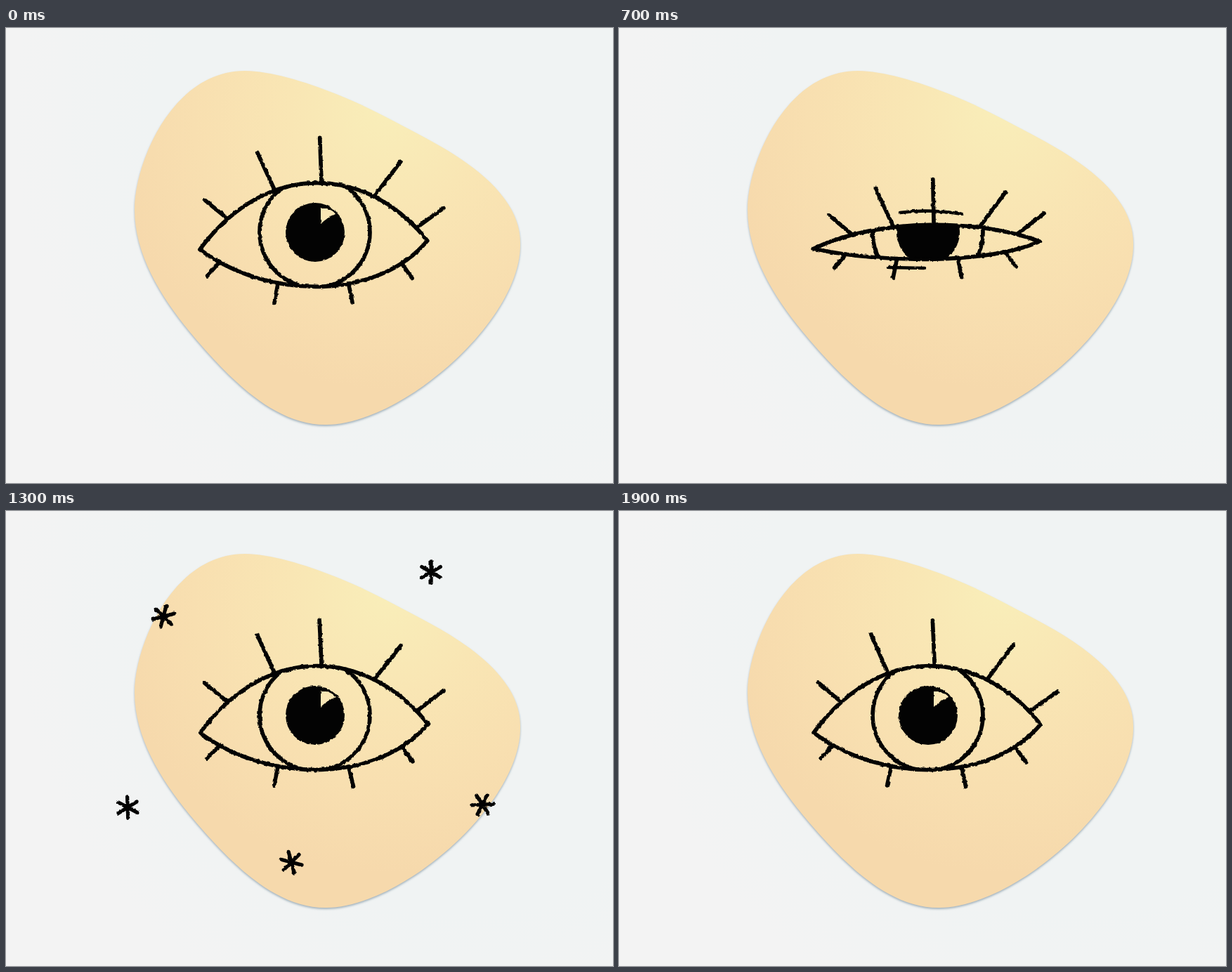
An HTML page for the animation above (2000 ms loop, 864 by 648 pixels).

```html
<!DOCTYPE html>
<html lang="en">
<head>
<meta charset="utf-8">
<title>Blinking eye</title>
<style>
  html, body { margin: 0; width: 100%; height: 100%; overflow: hidden; background: #f2f3f3; }
  svg { display: block; width: 100vw; height: 100vh; }
  .ink { fill: none; stroke: #030303; stroke-width: 5.7; stroke-linecap: round; stroke-linejoin: round; }
</style>
</head>
<body>
<svg viewBox="0 0 864 648">
  <defs>
    <radialGradient id="sky" gradientUnits="userSpaceOnUse" cx="650" cy="130" r="800">
      <stop offset="0" stop-color="#f0f3f3"/>
      <stop offset=".55" stop-color="#f0f3f3"/>
      <stop offset=".8" stop-color="#f3f3f3"/>
    </radialGradient>
    <radialGradient id="sand" gradientUnits="userSpaceOnUse" cx="545" cy="115" r="400">
      <stop offset="0" stop-color="#f9eeb9"/>
      <stop offset=".35" stop-color="#f9e6b4"/>
      <stop offset=".7" stop-color="#f8dfb0"/>
      <stop offset="1" stop-color="#f6d9ac"/>
    </radialGradient>
    <filter id="shade" x="-5%" y="-5%" width="110%" height="110%">
      <feDropShadow dx="0" dy="2" stdDeviation="1.5" flood-color="#8fa3ae" flood-opacity=".8"/>
    </filter>
    <filter id="rough" filterUnits="userSpaceOnUse" x="0" y="0" width="864" height="648" color-interpolation-filters="sRGB">
      <feTurbulence id="grain" type="fractalNoise" baseFrequency=".18" numOctaves="2" result="noise"/>
      <feDisplacementMap in="SourceGraphic" in2="noise" scale="3.4" xChannelSelector="R" yChannelSelector="G"/>
    </filter>
    <clipPath id="opening"><path id="hole"/></clipPath>
  </defs>

  <rect width="864" height="648" fill="url(#sky)"/>
  <path fill="url(#sand)" filter="url(#shade)" d="M340 61C375 61 425 76 470 94C520 114 560 137 598 157
    C650 185 732 235 732 306C735 416 563 565 455 565C392 565 338 517 296 472
    C240 411 183 338 183 258C183 193 236 61 340 61Z"/>

  <g filter="url(#rough)" class="ink">
    <g clip-path="url(#opening)">
      <circle cx="439.5" cy="291" r="78.5"/>
      <circle id="pupil" cx="440" cy="291" fill="#030303" stroke="none"/>
      <path fill="#f9e6b5" stroke="none" d="M448 257L457 257Q466 260 469 265Q457 270 448 279Z"/>
    </g>
    <path id="lids"/>
    <path id="lashes"/>
    <path id="trail" d="M400 263Q440 257 488 265M384 341L435 342" stroke-width="4.6"/>
    <path id="stars"/>
  </g>
</svg>
<script>
const $ = id => document.getElementById(id);
const STEP = 100, STEPS = 20;
const AXIS = 310;  // height where the lids meet

// Inner control points of each lid, and lashes as place along the lid plus reach.
const upper = {
  bend: [[372, 186], [515, 196]],
  lashes: [[.13, -34, -28], [.33, -25, -55], [.52, -2, -65], [.74, 37, -49], [.94, 39, -29]]
};
const lower = {
  bend: [[375, 389], [530, 387]],
  lashes: [[.09, -17, 19], [.33, -6, 27], [.61, 6, 27], [.85, 16, 21]]
};

// Star: centre and tilt in degrees.
const stars = [[224, 150, -15], [605, 87, -30], [173, 422, -32], [678, 418, -3], [406, 500, 15]];

const pt = p => p.map(v => v.toFixed(1)).join(" ");
const line = (a, b) => `M${pt(a)}L${pt(b)}`;

function random(seed) {
  return () => {
    seed = (seed * 16807) % 2147483647;
    return seed / 2147483647;
  };
}

function bezier([a, b, c, d], t) {
  const u = 1 - t;
  return a.map((_, i) => u * u * u * a[i] + 3 * u * u * t * b[i] + 3 * u * t * t * c[i] + t * t * t * d[i]);
}

// Steady close, then a quick reopening.
function openness(n) {
  const closing = 1 - .134 * (n - 2);
  const opening = .2 + .8 * (n - 8) / 3;
  return Math.min(1, Math.max(closing, opening));
}

const starSize = n => Math.max(0, Math.min(1.05, (n - 9) / 2, (15.4 - n) / 2.5));

function starPath([x, y, tilt], size) {
  const drift = Math.max(0, 1 - size);
  const cx = x + 3 * drift, cy = y + 4 * drift;
  return [0, 60, 120].map(turn => {
    const a = (tilt + turn) * Math.PI / 180;
    const dx = 16 * size * Math.cos(a), dy = 16 * size * Math.sin(a);
    return line([cx - dx, cy - dy], [cx + dx, cy + dy]);
  }).join("");
}

function draw(n) {
  const cycle = n % 11;
  const rnd = random(7919 * (cycle + 1));
  const wobble = (x, y) => [x + 2.4 * (rnd() - .5), y + 2.4 * (rnd() - .5)];

  const k = openness(n);
  const left = wobble(277, 315), right = wobble(599.5, 304);
  const lid = ({ bend }) => [left, ...bend.map(([x, y]) => [x, AXIS + (y - AXIS) * k]), right];
  const top = lid(upper), bottom = lid(lower);
  const rim = `M${pt(left)}C${top.slice(1).map(pt).join(" ")}` +
    `C${bottom.slice(0, 3).reverse().map(pt).join(" ")}Z`;

  // Lash roots draw together as the eye narrows.
  const squeeze = 1 - .2 * (1 - k);
  const fringe = (side, edge) => side.lashes.map(([t, dx, dy]) => {
    const root = bezier(edge, .5 + (t - .5) * squeeze);
    return line(root, wobble(root[0] + dx, root[1] + dy));
  }).join("");

  $("hole").setAttribute("d", rim);
  $("lids").setAttribute("d", rim);
  $("lashes").setAttribute("d", fringe(upper, top) + fringe(lower, bottom));
  $("pupil").setAttribute("r", 42 + 4.5 * (1 - k));
  $("trail").setAttribute("visibility", n === 7 ? "visible" : "hidden");

  const size = starSize(n);
  $("stars").setAttribute("d", size ? stars.map(s => starPath(s, size)).join("") : "");
  $("stars").setAttribute("stroke-width", 1.2 + 4.2 * Math.min(1, size));
  $("grain").setAttribute("seed", cycle + 1);
}

let shown = -1;
const start = performance.now();
function tick() {
  const n = Math.floor((performance.now() - start) / STEP) % STEPS;
  if (n !== shown) draw(shown = n);
  requestAnimationFrame(tick);
}
tick();
</script>
</body>
</html>
```
